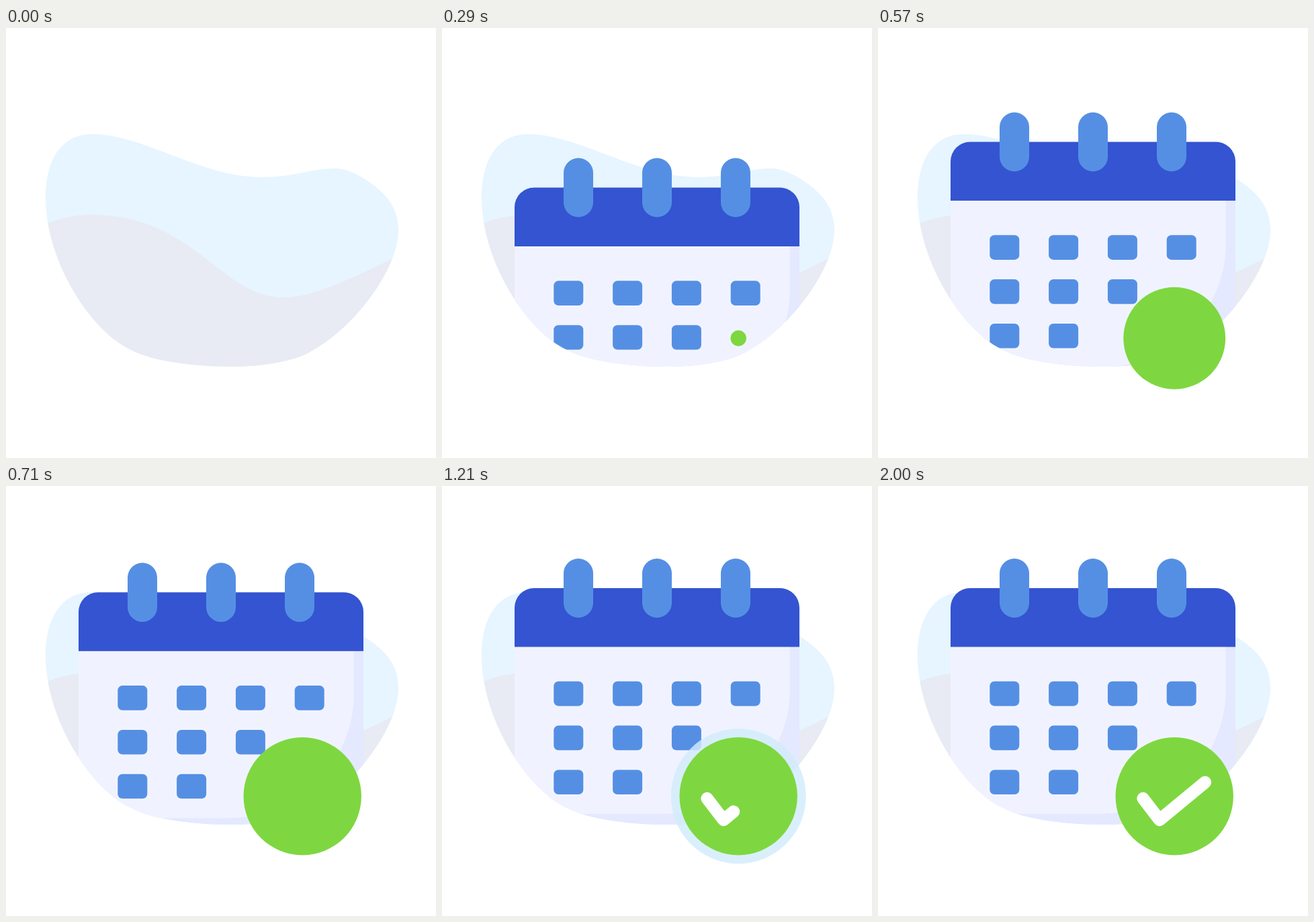
An HTML page for the animation above (3570 ms loop, 640x640 px).

```html
<!DOCTYPE html>
<html lang="en">
<head>
<meta charset="utf-8">
<title>Calendar check</title>
<style>
html, body { margin: 0; height: 100%; overflow: hidden; background: #fff; }
svg { display: block; width: 100%; height: 100%; }
</style>
</head>
<body>
<svg viewBox="0 0 640 640">
  <defs>
    <path id="blob" d="M59 252C59 200 80 158 128 158C204 158 290 222 380 222C430 222 455 209 490 209C515 209 547 231 564 249C576 262 584 280 584 301C584 358 520 446 451 483C424 497 382 504 333 504C280 504 217 496 186 479C127 452 59 348 59 252Z"/>
    <clipPath id="inBlob"><use href="#blob"/></clipPath>
    <!-- open above, bounded below by the blob's lower edge -->
    <clipPath id="pocket"><path d="M0 0H640V301H584C584 358 520 446 451 483C424 497 382 504 333 504C280 504 217 496 186 479C127 452 59 348 59 252H0Z"/></clipPath>
  </defs>
  <use href="#blob" fill="#e6f5ff"/>
  <path clip-path="url(#inBlob)" fill="#e8ebf3" d="M50 296C75 284 100 278 128 278C280 278 320 401 413 401C460 401 520 370 590 336V520H50Z"/>
  <g clip-path="url(#pocket)">
    <g id="calendar">
      <path fill="#e4e9ff" d="M108 238H532V700H108Z"/>
      <path fill="#f0f3ff" d="M108 238H517.7V304A190 184 0 0 1 328 488H108Z"/>
      <path fill="#3454d1" d="M108 239.5V181A29 29 0 0 1 137 152H503A29 29 0 0 1 532 181V239.5Z"/>
      <g id="marks" fill="#558fe4"/>
    </g>
  </g>
  <g transform="translate(441.2 461.7)">
    <circle id="halo" fill="#d2ecfc"/>
    <circle id="disc" fill="#7ed740"/>
  </g>
  <path id="check" d="M394.5 465L419 497L486.8 441" pathLength="1" fill="none" stroke="#fff" stroke-width="18.5" stroke-linecap="round" stroke-linejoin="round"/>
</svg>
<script>
const LOOP = 3570, FPS = 14, LAST = 28, RADIUS = 87.7;
const [calendar, marks, halo, disc, check] =
  ['calendar', 'marks', 'halo', 'disc', 'check'].map(id => document.getElementById(id));

function set(el, attrs) {
  for (const name in attrs) el.setAttribute(name, attrs[name]);
}

function addMark(x, y, width, height, rx) {
  const rect = document.createElementNS('http://www.w3.org/2000/svg', 'rect');
  set(rect, { x, y, width, height, rx });
  marks.append(rect);
}

for (let i = 0; i < 3; i++) addMark(181 + 117 * i, 108, 44, 88, 22);
[4, 3, 2].forEach((days, row) => {
  for (let i = 0; i < days; i++) addMark(166.3 + 87.8 * i, 290.8 + 65.8 * row, 44, 36.6, 7);
});

// Eased progress of a step between two other steps
function progress(step, from, to) {
  const t = Math.min(1, Math.max(0, (step - from) / (to - from)));
  const half = u => (2 * u) ** 1.9 / 2;
  return t < 0.5 ? half(t) : 1 - half(1 - t);
}

// Steep decay that settles into a quadratic stop
function drop(step) {
  if (step < 8) return 442 * Math.exp(-0.4176 * step + 0.00175 * step * step);
  return 17.5 * (Math.max(0, 13 - step) / 5) ** 2;
}

function draw(ms) {
  const step = Math.min(LAST, Math.floor(ms * FPS / 1000 + 0.065));
  const pulse = progress(step, 12, LAST);
  const drawn = progress(step, 13, 21.3);
  set(calendar, { transform: `translate(0 ${drop(step)})` });
  set(disc, { r: RADIUS * progress(step, 2, 10) });
  set(halo, { r: step > 12 ? RADIUS + 62.6 * pulse : 0, opacity: (1 - pulse) ** 0.85 });
  set(check, { 'stroke-dasharray': `${drawn} 2`, visibility: drawn ? 'visible' : 'hidden' });
}

let start;
function tick(now) {
  start ??= now;
  draw((now - start) % LOOP);
  requestAnimationFrame(tick);
}
draw(0);
requestAnimationFrame(tick);
</script>
</body>
</html>
```
